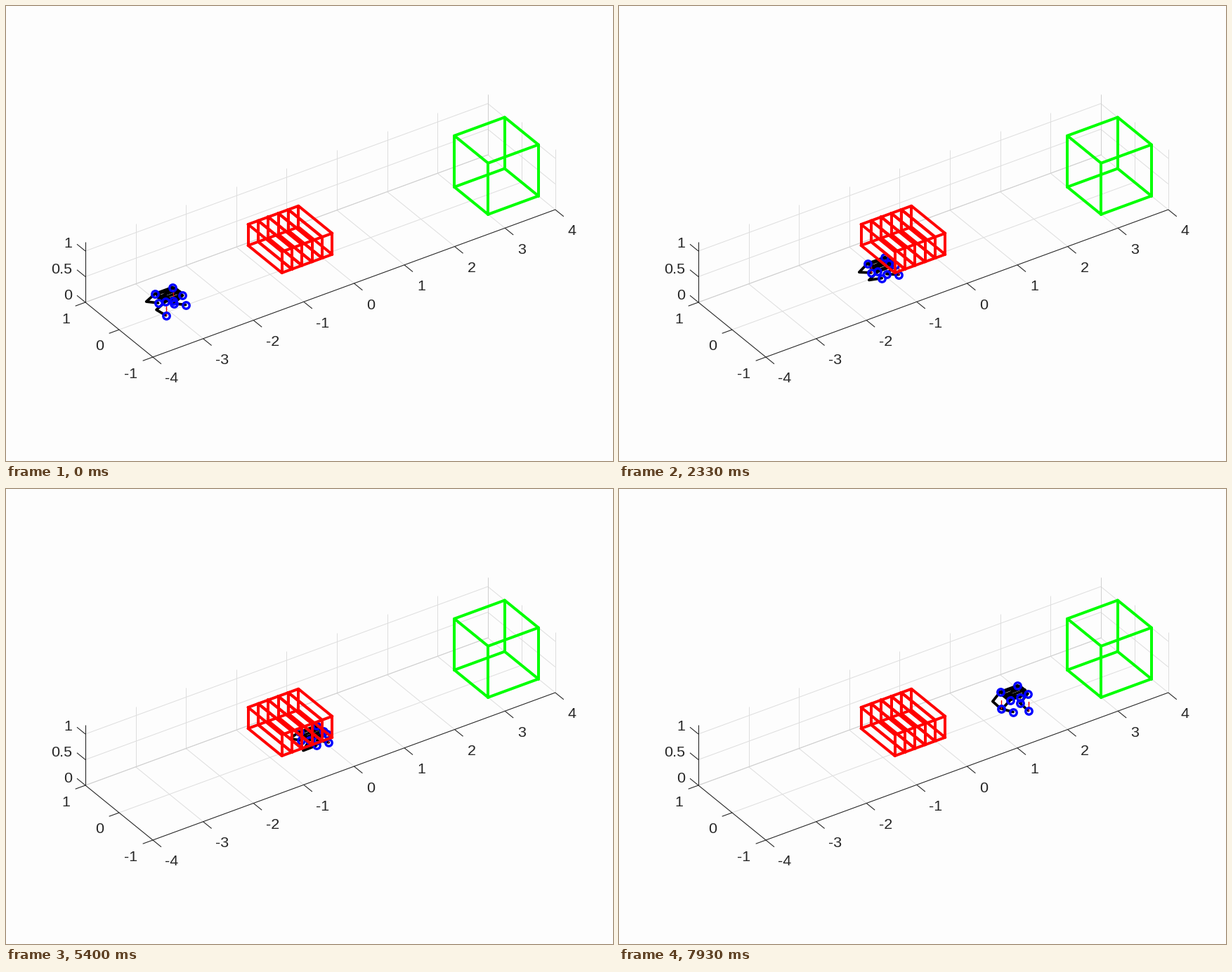
A matplotlib script for the animation above (8000 ms loop, 864x648 px).

```python
import itertools
import numpy as np
import matplotlib.pyplot as plt
from matplotlib.animation import FuncAnimation
from matplotlib.collections import LineCollection

W, H, DPI = 864, 648, 100
PX = 72 / DPI
FPS, FRAMES = 15, 120

plt.rcParams["font.family"] = "Liberation Sans"
fig = plt.figure(figsize=(W / DPI, H / DPI), dpi=DPI, facecolor="#fdfdfd")
ax = fig.add_axes([0, 0, 1, 1])
ax.set_xlim(0, W)
ax.set_ylim(H, 0)
ax.axis("off")


def project(x, y, z):
    """Orthographic view: world units to stage pixels."""
    return 447.4 + 71.6 * x - 48 * y, 356 - 26.25 * x - 39 * y - 73 * z


def add_lines(segments, color, width, z, cap="butt"):
    pts = [(project(*a), project(*b)) for a, b in segments]
    ax.add_collection(LineCollection(pts, colors=color, linewidths=width * PX,
                                     zorder=z, capstyle=cap))


def box_edges(x0, x1, y0, y1, z0, z1):
    corners = list(itertools.product((x0, x1), (y0, y1), (z0, z1)))
    return [(a, b) for a, b in itertools.combinations(corners, 2)
            if sum(p != q for p, q in zip(a, b)) == 1]


def label(x, y, text, ha="center"):
    ax.text(x, y, text, ha=ha, va="center_baseline", fontsize=21.5 * PX,
            color="#262626")


def draw_axes():
    top = 1.18
    grid = [((x, -1, 0), (x, 1, 0)) for x in range(-3, 5)]
    grid += [((x, 1, 0), (x, 1, top)) for x in range(-3, 5)]
    grid += [((-4, y, 0), (4, y, 0)) for y in (0, 1)]
    grid += [((4, y, 0), (4, y, top)) for y in (-1, 0)]
    for z in (0.5, 1):
        grid += [((-4, 1, z), (4, 1, z)), ((4, -1, z), (4, 1, z))]
    add_lines(grid, "#dedede", 1, 1)
    add_lines([((-4, 1, 0), (4, 1, 0)), ((4, 1, 0), (4, 1, top))],
              "#cfcfcf", 1, 1)

    rules = [((-4, -1, 0), (4, -1, 0)), ((-4, -1, 0), (-4, 1, 0)),
             ((-4, 1, 0), (-4, 1, top))]
    for x in range(-4, 5):
        rules.append(((x, -1, 0), (x, -1.25, 0)))
        px, py = project(x, -1, 0)
        label(px + (27 if x < 0 else 24), py + 29, str(x))
    for y in (-1, 0, 1):
        rules.append(((-4, y, 0), (-4.2, y, 0)))
        px, py = project(-4, y, 0)
        label(px - (31 if y < 0 else 28), py + 22, str(y))
    for z in (0, 0.5, 1):
        rules.append(((-4, 1, z), (-4, 1.25, z)))
        px, py = project(-4, 1, z)
        label(px - 19, py - 12, f"{z:g}", "right")
    add_lines(rules, "#262626", 1.1, 2)


draw_axes()
add_lines(box_edges(3, 4, -0.5, 0.5, 0, 1), "#00ff00", 4, 8, "round")
slabs = []
for i in range(5):
    left = -1.1 + 0.2 * i
    slabs += box_edges(left, left + 0.2, -0.5, 0.5, 0.334, 0.745)
add_lines(slabs, "#ff0000", 4, 8, "round")

# Robot: (x offset, y offset, gait phase offset) for each hip
HIPS = [(-0.172, 0.15, 0.5), (0.172, 0.15, 0),
        (0.172, -0.15, 0.5), (-0.172, -0.15, 0)]
FRONT_RIGHT = 2
THIGH, SHIN = 0.2, 0.26


def body_state(t):
    """Body position, height over ground, gait phase and stride."""
    x = np.interp(t, [0, 1.2, 2, 5.4, 6.05, 8],
                  [-3.01, -1.87, -1.11, -0.145, 0.037, 1.717])
    z = np.interp(t, [1.7, 2.3, 3, 5.5, 6.2], [0.33, 0.2, 0.155, 0.17, 0.325])
    h = np.interp(t, [0, 0.4, 1.7, 2.3, 3, 5.5, 6.2],
                  [0.27, 0.335, 0.335, 0.2, 0.17, 0.18, 0.335])
    phase = np.interp(t, [0, 1.2, 2.33, 5.4, 6.27, 7.93],
                      [0.28, 2.42, 4.9, 10.9, 12.46, 14.87])
    stride = np.interp(t, [1.7, 2.3, 5.5, 6.2], [0.15, 0.07, 0.07, 0.15])
    shift = np.interp(t, [1.7, 2.3, 5.5, 6.2], [0.03, 0.08, 0.08, 0.03])
    return x, z, h, phase, stride, shift


def foot_offset(phase, h, stride):
    """Foot relative to hip, and whether it bears load."""
    p = phase % 1
    if p < 0.5:
        return stride * (1 - 4 * p), -h, True
    s = (p - 0.5) * 2
    return -stride * np.cos(np.pi * s), -h + 0.25 * h * np.sin(np.pi * s), False


def knee_offset(dx, dz):
    d = min(np.hypot(dx, dz), THIGH + SHIN - 0.01)
    ux, uz = np.array([dx, dz]) / np.hypot(dx, dz)
    a = (THIGH**2 - SHIN**2 + d * d) / (2 * d)
    b = np.sqrt(max(THIGH**2 - a * a, 0))
    return a * ux + b * uz, a * uz - b * ux


def polyline(color, width, z):
    return ax.plot([], [], color=color, lw=width * PX, zorder=z,
                   solid_joinstyle="round", solid_capstyle="round")[0]


body = LineCollection([], colors="black", linewidths=3.6 * PX, zorder=4,
                      capstyle="round")
ax.add_collection(body)
legs = [polyline("black", 3.8, 4) for _ in HIPS]
forces = [polyline("#e00000", 1.4, 5) for _ in HIPS]
joints = ax.plot([], [], "o", ms=9.4 * PX, mfc="none", mec="#0000ff",
                 mew=3.4 * PX, zorder=6)[0]


def update(i):
    x, z, h, phase, stride, shift = body_state(i / FPS)
    hips = [(x + hx, hy, z) for hx, hy, _ in HIPS]
    edges = list(zip(hips, hips[1:] + hips[:1]))
    edges += box_edges(x - 0.172, x + 0.172, -0.075, 0.075, z - 0.03, z + 0.03)
    body.set_segments([(project(*a), project(*b)) for a, b in edges])

    dots = [project(*hip) for hip in hips]
    for k, (hx, hy, hz) in enumerate(hips):
        dx, dz, loaded = foot_offset(phase + HIPS[k][2], h, stride)
        dx += shift
        kx, kz = knee_offset(dx, dz)
        knee = project(hx + kx, hy, hz + kz)
        foot = project(hx + dx, hy, hz + dz)
        legs[k].set_data(*zip(dots[k], knee, foot))
        dots.append(foot)
        if k == FRONT_RIGHT:
            dots.append(knee)
        tip = project(hx + dx, hy, hz + dz + 0.17)
        forces[k].set_data(*zip(foot, tip))
        forces[k].set_visible(loaded)
    joints.set_data(*zip(*dots))
    return [body, joints, *legs, *forces]


anim = FuncAnimation(fig, update, frames=FRAMES, interval=1000 / FPS,
                     init_func=lambda: update(0), repeat=True, repeat_delay=0)
plt.show()
```
